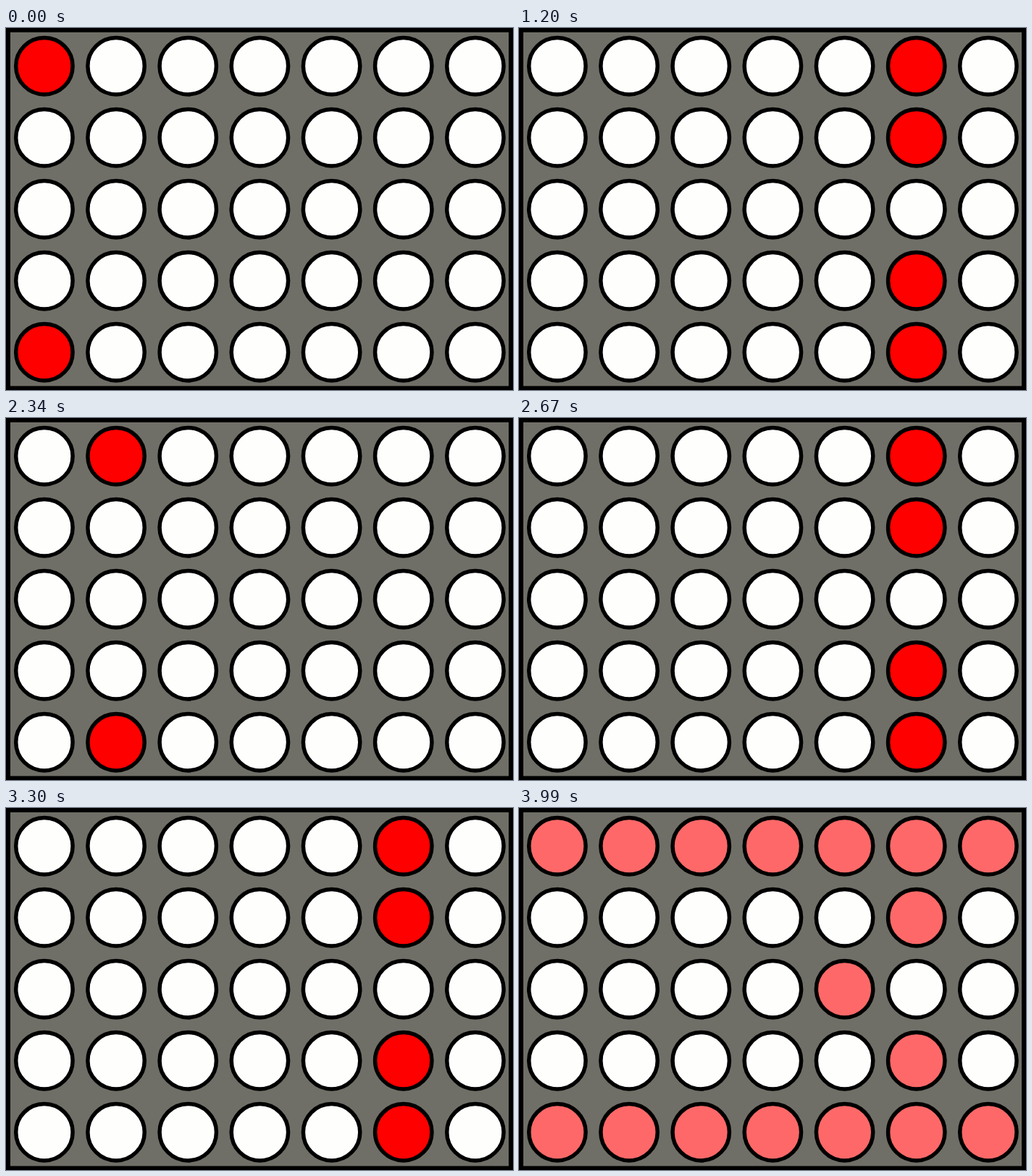
Recreate the animation shown at these times as an HTML page. Size 700 by 501 pixels, loop 5.99 s.

```html
<!DOCTYPE html>
<html lang="en">
<head>
<meta charset="utf-8">
<title>Column scan</title>
<style>
  html, body { margin: 0; width: 100%; height: 100%; overflow: hidden; background: #000; }
  svg { display: block; width: 700px; height: 501px; }
  circle { stroke: #000; stroke-width: 5.5; }
</style>
</head>
<body>
<svg id="panel" viewBox="0 0 700 501">
  <rect width="700" height="501" fill="#000"/>
  <rect x="6" y="6" width="688" height="489.5" fill="#706f67"/>
</svg>
<script>
const GLYPH = [
  '#######',
  '.....#.',
  '....#..',
  '.....#.',
  '#######'
];
const COLS = 7;
const SLOW = 100, FAST = 30;
const SLOW_END = 3 * COLS * SLOW;
const SCAN_END = SLOW_END + 9 * COLS * FAST;
const LOOP = SCAN_END + 2000;
const OFF = '#fefffd', LIT = '#ff0000', BLEND = '#ff6868';

const panel = document.getElementById('panel');
const lamps = [];
GLYPH.forEach((line, row) => {
  for (let col = 0; col < COLS; col++) {
    const el = document.createElementNS('http://www.w3.org/2000/svg', 'circle');
    el.setAttribute('cx', 52.9 + 99.17 * col);
    el.setAttribute('cy', 52.7 + 99 * row);
    el.setAttribute('r', 39.2);
    panel.append(el);
    lamps.push({ el, col, on: line[col] === '#' });
  }
});

// Active column, or -1 once the whole glyph is held.
function columnAt(t) {
  if (t >= SCAN_END) return -1;
  const step = t < SLOW_END ? t / SLOW : (t - SLOW_END) / FAST;
  return Math.floor(step) % COLS;
}

let shown = null;
function draw(t) {
  const active = columnAt(t);
  if (active === shown) return;
  shown = active;
  for (const { el, col, on } of lamps) {
    const color = !on ? OFF : active < 0 ? BLEND : col === active ? LIT : OFF;
    el.setAttribute('fill', color);
  }
}

const start = performance.now();
function tick() {
  draw((performance.now() - start) % LOOP);
  requestAnimationFrame(tick);
}
tick();
</script>
</body>
</html>
```
